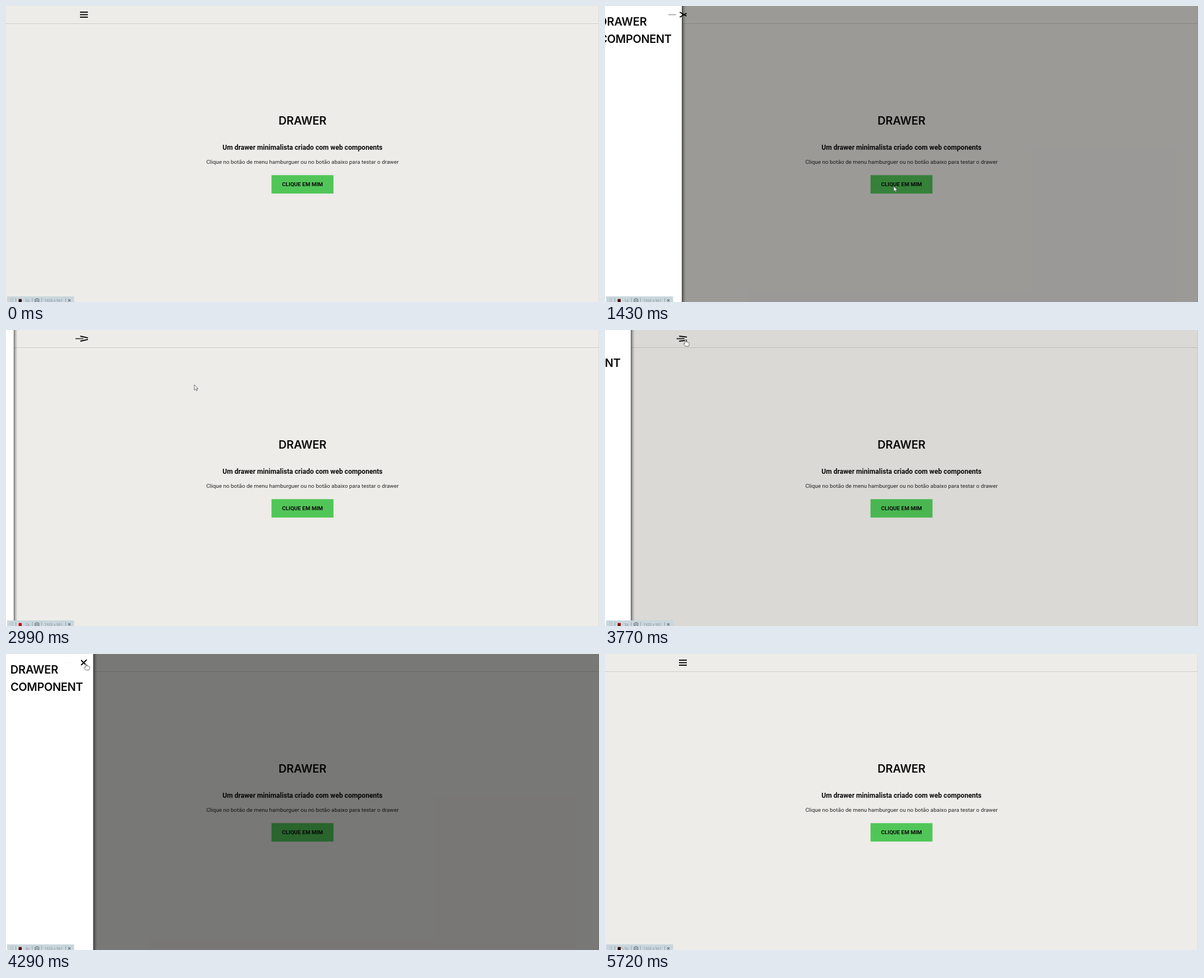
Write an HTML page that moves like this. It is 1058 by 529 pixels and loops after 5980 ms.

```html
<!DOCTYPE html>
<html lang="pt">
<head>
<meta charset="utf-8">
<title>Drawer</title>
<style>
  html, body { margin: 0; width: 100%; height: 100%; overflow: hidden; background: #edece8; }
  svg { display: block; width: 100vw; height: 100vh; }
  text { font-family: Roboto, sans-serif; fill: #0b0b0b; }
  .mid { text-anchor: middle; }
  .title { font: 600 20px Inter, sans-serif; }
  .icon line { stroke: #000; stroke-width: 1.9; }
  .rec text { font-size: 6.7px; fill: #8c999f; }
</style>
</head>
<body>
<svg viewBox="0 0 1058 529" preserveAspectRatio="none">
  <defs>
    <linearGradient id="shade">
      <stop offset="0" stop-color="#000" stop-opacity=".6"/>
      <stop offset=".4" stop-color="#000" stop-opacity=".24"/>
      <stop offset="1" stop-color="#000" stop-opacity="0"/>
    </linearGradient>
  </defs>

  <rect width="1058" height="529" fill="#edece8"/>
  <rect y="31" width="1058" height="1" fill="#cdccc9"/>
  <rect x="1057" width="1" height="529" fill="#dcdbd9"/>
  <text class="mid title" x="529" y="212.3" letter-spacing="-.15">DRAWER</text>
  <text class="mid" x="529" y="257" font-size="12.12" font-weight="700">Um drawer minimalista criado com web components</text>
  <text class="mid" x="529" y="281.7" font-size="9.92" style="fill:#242424">Clique no botão de menu hamburguer ou no botão abaixo para testar o drawer</text>
  <rect x="473.7" y="302.3" width="110.6" height="32.9" fill="#51c658"/>
  <text class="mid" x="529" y="322.2" font-size="9.92" font-weight="700">CLIQUE EM MIM</text>

  <rect id="backdrop" width="1058" height="529"/>

  <g id="drawer">
    <rect x="155.5" width="7" height="529" fill="url(#shade)"/>
    <rect width="155.5" height="529" fill="#fff"/>
    <text class="title" x="7.8" y="35.4" letter-spacing="-.15">DRAWER</text>
    <text class="title" x="8" y="65.8" letter-spacing="-.38">COMPONENT</text>
  </g>

  <g class="icon">
    <line id="top" x2="14"/>
    <line id="middle" x2="14"/>
    <line id="bottom" x2="14"/>
  </g>

  <g class="rec">
    <rect x="2" y="519" width="119.5" height="10" fill="#c9d6dd"/>
    <path d="M9 522v7M12 522v7" stroke="#84929a" stroke-width="1" stroke-dasharray="1 1.8"/>
    <path d="M17.5 522v7M47 522v7M63.5 522v7M106.5 522v7" stroke="#8b989e" stroke-width=".8"/>
    <rect x="21.5" y="522.8" width="7.5" height="6.2" fill="#e3e9ec"/>
    <rect id="dot" x="22.5" y="523.6" width="5.6" height="5.4"/>
    <text id="clock" x="34.8" y="528.6"></text>
    <path d="M51 523.5h2l1-1.5h3l1 1.5h1.5v5.5h-8.5z" fill="#87949a"/>
    <circle cx="55.3" cy="526.2" r="1.9" fill="#87949a" stroke="#dce4e8" stroke-width=".8"/>
    <text x="68.2" y="528.6">1920 x 961</text>
    <path d="M111 524.2l4 4M115 524.2l-4 4" stroke="#5d686d" stroke-width="1.1"/>
  </g>

  <path id="arrow" d="M0 0V9.4L2.2 7.4L3.8 10.7L5.3 10L3.8 6.9H6.8Z" fill="#fff" stroke="#333" stroke-width=".7"/>
  <path id="hand" d="M-1 1Q0-.6 1 1V4.6Q2-.0 3 4.8Q4.3 3.6 4.9 5.2Q6.4 4.4 6.6 6V8.6Q6.4 10 5.4 11.6H-.3L-3.3 7.3Q-3.3 5.5-1 7Z" fill="#fff" stroke="#333" stroke-width=".7" stroke-linejoin="round"/>
</svg>

<script>
const LOOP = 5980, STEP = 130, WIDTH = 155.5;
const el = id => document.getElementById(id);
const place = (id, x, y, turn = 0) =>
  el(id).setAttribute("transform", `translate(${x} ${y}) rotate(${turn})`);
const show = (id, on) => el(id).setAttribute("visibility", on ? "visible" : "hidden");

// Each click toggles the drawer
const clicks = [1133, 2668, 3670, 4740];

// Pointer stops: time, x, y
const stops = [
  [130, 285, 440], [390, 515, 322], [1560, 515, 322],
  [2080, 467, 192], [2600, 467, 192], [2990, 336, 98],
  [3510, 144, 17.5], [4940, 141.5, 17], [5720, 28, 524]
];

function pointer(t) {
  const n = stops.findIndex(s => s[0] > t);
  if (n < 1) return stops.at(n).slice(1);
  const [t0, x0, y0] = stops[n - 1], [t1, x1, y1] = stops[n];
  const f = (t - t0) / (t1 - t0);
  return [x0 + (x1 - x0) * f, y0 + (y1 - y0) * f];
}

// cubic-bezier(.25, .1, .25, 1)
function ease(x) {
  if (x >= 1) return 1;
  const curve = (a, b, s) => 3 * a * s * (1 - s) ** 2 + 3 * b * s * s * (1 - s) + s ** 3;
  let lo = 0, hi = 1;
  for (let i = 0; i < 24; i++) {
    const s = (lo + hi) / 2;
    if (curve(.25, .25, s) < x) lo = s; else hi = s;
  }
  return curve(.1, 1, lo);
}

function draw(time) {
  const t = Math.floor((time % LOOP) / STEP) * STEP;
  const past = clicks.filter(c => c <= t);
  const open = past.length % 2 === 1;
  const openness = duration => {
    if (!past.length) return 0;
    const p = ease((t - past.at(-1)) / duration);
    return open ? p : 1 - p;
  };

  const slide = openness(500);
  show("drawer", slide > 0);
  place("drawer", (slide - 1) * WIDTH, 0);
  el("backdrop").setAttribute("fill-opacity", open ? .5 * openness(720) : 0);

  const turn = openness(760);
  place("top", 132 + 2 * turn, 11, 45 * turn);
  place("bottom", 132 + 2 * turn, 20, -45 * turn);
  place("middle", 132 - 28.5 * turn, 15.5);
  el("middle").setAttribute("opacity", 1 - turn);

  const glow = .07 + .9 * Math.exp(-(((t - 2950) / 1100) ** 2));
  el("dot").setAttribute("fill", `rgb(${30 + 175 * glow}, ${14 - 12 * glow}, ${10 - 6 * glow})`);
  el("clock").textContent = Math.floor((t + 400) / 1170) + "s";

  const [x, y] = pointer(t);
  const onButton = t >= 390 && t < clicks[0];
  const onIcon = t >= 3380 && t <= 4940;
  const hand = onButton || onIcon;
  show("hand", hand);
  show("arrow", t >= stops[0][0] && !hand);
  place("hand", x, y);
  place("arrow", x, y);
}

const start = performance.now();
function tick() {
  draw(performance.now() - start);
  requestAnimationFrame(tick);
}
tick();
</script>
</body>
</html>
```
